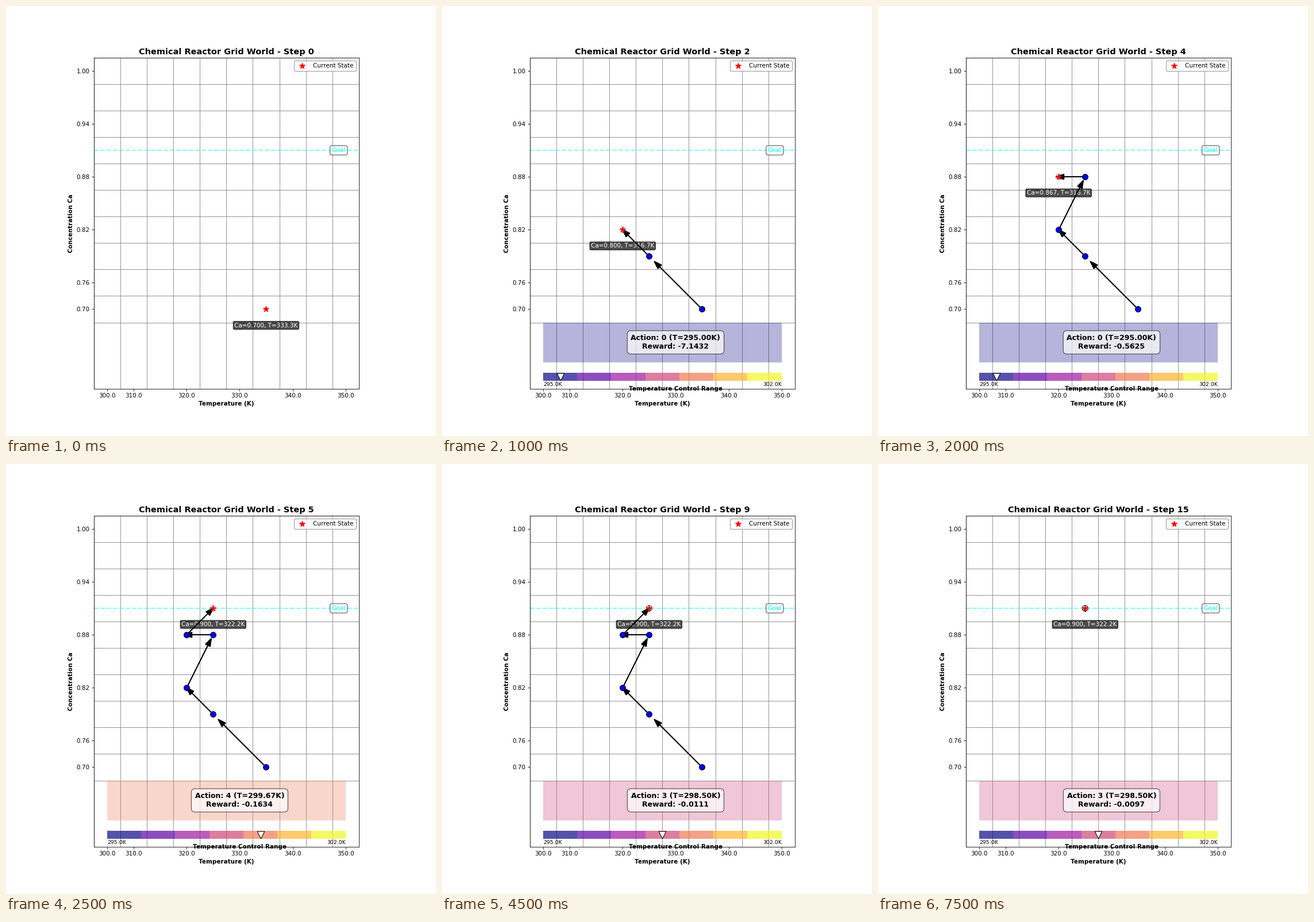
Write a matplotlib script that moves like this. It is 748x748 px and loops after 8000 ms.

```python
import matplotlib.pyplot as plt
import numpy as np
from matplotlib.animation import FuncAnimation
from matplotlib.patches import Rectangle

N = 10                      # grid cells per side
ACTIONS = 7
TRAIL = 10                  # visited states kept on screen
T_LOW, T_HIGH = 295.0, 302.0
GOAL_ROW = 6

path = [(6, 0), (4, 2), (3, 3), (4, 5), (3, 5)] + [(4, 6)] * 11
actions = [None, 1, 0, 3, 0, 4] + [3] * 10
rewards = [0, -18.7336, -7.1432, -2.2943, -0.5625, -0.1634, -0.0552, -0.0231,
           -0.0141, -0.0111, -0.0101, -0.0096, -0.0095, -0.0095, -0.0096, -0.0097]

fig, ax = plt.subplots(figsize=(10, 10), dpi=74.8)
colors = plt.cm.plasma(np.linspace(0, 1, ACTIONS))


def draw_grid(step):
    ax.set_xlim(-0.5, N - 0.5)
    ax.set_ylim(-3, N - 0.5)
    ax.set_aspect("equal")
    ticks = [0, 1, 3, 5, 7, 9]
    ax.set_xticks(ticks, [f"{t:.1f}" for t in range(300, 351, 10)])
    ax.set_yticks(ticks, [f"{c:.2f}" for c in np.linspace(0.7, 1, 6)])
    edges = np.arange(-0.5, N)
    ax.set_xticks(edges, minor=True)
    ax.set_yticks(edges, minor=True)
    ax.tick_params(which="minor", length=0)
    ax.set_axisbelow(True)
    ax.grid(which="minor", color="gray", linewidth=0.8)
    ax.set_xlabel("Temperature (K)", weight="bold")
    ax.set_ylabel("Concentration Ca", weight="bold")
    ax.set_title(f"Chemical Reactor Grid World - Step {step}", size=14, weight="bold")


def draw_goal():
    ax.axhline(GOAL_ROW, color="cyan", ls="--", lw=2, alpha=0.5)
    ax.text(N - 1, GOAL_ROW, "Goal", color="cyan", ha="right", va="center",
            bbox=dict(boxstyle="round,pad=0.3", fc="white", alpha=0.7))


def draw_state(step):
    x, y = path[step]
    ax.scatter(x, y, s=100, c="red", marker="*", zorder=6, label="Current State")
    ca, temp = 0.7 + 0.3 * y / (N - 1), 300 + 50 * x / (N - 1)
    ax.text(x, y - 0.5, f"Ca={ca:.3f}, T={temp:.1f}K", color="white",
            ha="center", va="top",
            bbox=dict(boxstyle="round,pad=0.2", fc="black", alpha=0.7))
    ax.legend(loc="upper right", edgecolor="gray")


def draw_trail(step):
    trail = path[max(0, step - TRAIL + 1):step + 1]
    for (x0, y0), (x1, y1) in zip(trail, trail[1:]):
        if (x0, y0) != (x1, y1):
            ax.arrow(x0, y0, 0.8 * (x1 - x0), 0.8 * (y1 - y0), head_width=0.2,
                     head_length=0.3, fc="black", ec="black", lw=1.5, zorder=4)
    for point in trail:
        if point == path[step]:
            ax.scatter(*point, s=90, fc="none", ec="black", ls=":", lw=1, zorder=5)
        else:
            ax.scatter(*point, s=90, fc="blue", ec="black", lw=1, zorder=5)


def draw_action(step):
    act = actions[step]
    width = (N - 1) / ACTIONS
    ax.add_patch(Rectangle((0, -2), N - 1, 1.5, fc=colors[act], alpha=0.3,
                           ec="none"))
    temp = T_LOW + act * (T_HIGH - T_LOW) / (ACTIONS - 1)
    ax.text(N / 2, -1.25, f"Action: {act} (T={temp:.2f}K)\nReward: {rewards[step]:.4f}",
            size=12, weight="bold", ha="center", va="center",
            bbox=dict(boxstyle="round,pad=0.5", fc="white", alpha=0.7))
    for i, color in enumerate(colors):
        ax.add_patch(Rectangle((i * width, -2.7), width, 0.3, fc=color, alpha=0.7,
                               ec="none"))
    ax.scatter((act + 0.5) * width, -2.55, s=150, marker="v", fc="white",
               ec="black", lw=1, zorder=3)
    ax.text(0, -2.75, f"{T_LOW}K", size=9, ha="left", va="top")
    ax.text(N - 1, -2.75, f"{T_HIGH}K", size=9, ha="right", va="top")
    ax.text(N / 2, -3, "Temperature Control Range", weight="bold",
            ha="center", va="center")


def update(step):
    ax.clear()
    draw_grid(step)
    draw_goal()
    draw_state(step)
    if step:
        draw_trail(step)
        draw_action(step)
    return []


anim = FuncAnimation(fig, update, frames=len(path), init_func=lambda: [],
                     interval=500, repeat=True, repeat_delay=0)
plt.show()
```
